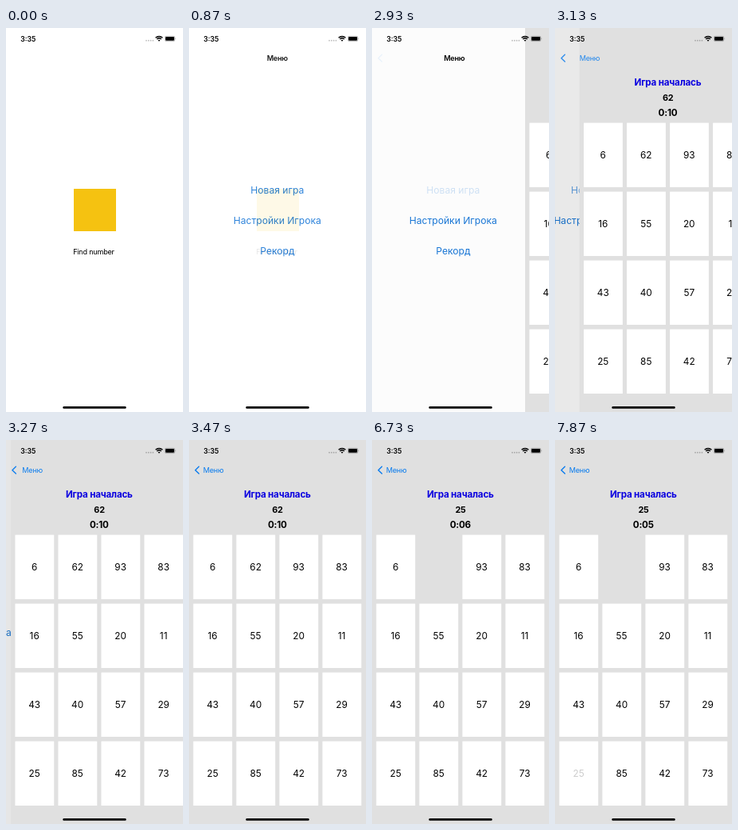
Write an HTML page that moves like this. It is 222 by 480 pixels and loops after 8 s.

```html
<!DOCTYPE html>
<html lang="ru">
<head>
<meta charset="utf-8">
<title>Find number</title>
<style>
  html, body { margin: 0; width: 100%; height: 100%; overflow: hidden; background: #fff; }
  svg { display: block; width: 222px; height: 480px; overflow: hidden; }
  text { font-family: Inter, "Noto Sans", sans-serif; text-anchor: middle; }
  .nav { font-size: 9.1px; letter-spacing: -.025em; }
  .item { font-size: 12.1px; fill: #1a78d8; }
  .num { font-size: 11.8px; }
  .bold { font-size: 11.6px; font-weight: 700; letter-spacing: -.015em; }
  .semi { font-weight: 600; }
  .blue { fill: #087bee; }
</style>
</head>
<body>
<svg viewBox="0 0 222 480">
  <rect width="222" height="480" fill="#fff"/>
  <g id="menu">
    <text id="play" class="item" x="110.8" y="206.6">Новая игра</text>
    <text class="item" x="110.8" y="244.6">Настройки Игрока</text>
    <text class="item" x="110.8" y="282.6">Рекорд</text>
  </g>
  <rect id="dim" width="222" height="480"/>

  <g id="game">
    <rect width="222" height="480" fill="#e0e0e0"/>
    <text class="bold" x="110.8" y="71.6" fill="#0a00e0">Игра началась</text>
    <text id="goal" class="bold" x="111" y="90.8" style="font-size:10.8px"></text>
    <text id="clock" class="bold" x="110.8" y="110.3"></text>
    <g id="cards"></g>
  </g>

  <text id="title" class="nav semi" x="110.8" y="41">Меню</text>
  <text id="back" class="nav blue" x="30.6" y="41">Меню</text>
  <path id="chevron" d="M12.4 33.3 7.9 37.7 12.4 42.1" fill="none" stroke="#087bee"
        stroke-width="1.35" stroke-linecap="round" stroke-linejoin="round"/>

  <g id="splash">
    <rect width="222" height="480" fill="#fff"/>
    <rect x="85" y="201" width="53" height="53" fill="#f5c211"/>
    <text class="nav" x="110" y="282.6">Find number</text>
  </g>

  <g id="status">
    <text class="semi" x="27.8" y="16.6" font-size="8.7">3:35</text>
    <g id="dots" fill="#000" opacity=".27"></g>
    <g id="wifi" fill="none" stroke="#000" stroke-width="1.5"></g>
    <rect x="199.2" y="10.2" width="12.6" height="6.4" rx="1.8" fill="none" stroke="#000" stroke-opacity=".4" stroke-width=".6"/>
    <rect x="200" y="11" width="11" height="4.8" rx="1.1"/>
    <path d="M212.6 12.3q1.1 1.1 0 2.2z" opacity=".5"/>
    <rect x="71.3" y="473.1" width="79.4" height="2.6" rx="1.3"/>
  </g>
</svg>
<script>
const $ = id => document.getElementById(id);
const clamp = v => Math.min(1, Math.max(0, v));

function add(parent, tag, attrs, text = '') {
  const el = document.createElementNS('http://www.w3.org/2000/svg', tag);
  for (const k in attrs) el.setAttribute(k, attrs[k]);
  el.textContent = text;
  return parent.appendChild(el);
}

const numbers = [6, 62, 93, 83, 16, 55, 20, 11, 43, 40, 57, 29, 25, 85, 42, 73];
const cards = {};
numbers.forEach((n, i) => {
  const x = 5.4 + 54 * (i % 4), y = 118.6 + 86 * Math.floor(i / 4);
  const box = add($('cards'), 'g', {});
  add(box, 'rect', { x, y, width: 48.8, height: 80.4, fill: '#fff' });
  const label = add(box, 'text', { x: x + 24.2, y: y + 44.6, class: 'num' }, n);
  cards[n] = { box, label };
});

for (let i = 0; i < 4; i++) add($('dots'), 'circle', { cx: 176 + 2.8 * i, cy: 15.7, r: .85 });
for (const r of [1.4, 4, 6.5]) {
  const dx = r * Math.sin(.74), y = 17 - r * Math.cos(.74);
  add($('wifi'), 'path', { d: `M${192 - dx} ${y}A${r} ${r} 0 0 1 ${192 + dx} ${y}` });
}

const LOOP = 8000, FPS = 15;
const PRESS_PLAY = 2670, PUSH = 2885, PUSH_END = 3470;
const FIRST_TICK = 3730, PRESS_62 = 4330, HIT_62 = 4470, PRESS_25 = 7870;

// Critically damped spring for the screen push
function push(t) {
  if (t < PUSH) return 0;
  if (t >= PUSH_END) return 1;
  const w = 14.2 * (t - PUSH) / 1000;
  return 1 - (1 + w) * Math.exp(-w);
}

const fade = (el, v) => el.setAttribute('opacity', v);
const slide = (el, x) => el.setAttribute('transform', `translate(${x} 0)`);

function draw(time) {
  const t = Math.round(Math.floor((time + 4) * FPS / 1000) * 100 / FPS) * 10;
  const p = push(t), nav = p ** 1.18;

  fade($('splash'), (1 - clamp((t - 600) / 470)) ** 2.75);

  slide($('menu'), -66.6 * p);
  fade($('play'), t < PRESS_PLAY ? 1 : .2 + .8 * clamp((t - 2930) / 330));
  fade($('dim'), .1 * p);
  slide($('game'), 222 * (1 - p));

  slide($('title'), -80 * nav);
  fade($('title'), clamp(1.2 - 1.5 * p));
  slide($('back'), 80 * (1 - nav));
  fade($('back'), p < .3 ? 0 : p);
  fade($('chevron'), p ** 1.3);

  const left = t < FIRST_TICK ? 10 : 9 - Math.floor((t - FIRST_TICK) / 1000);
  $('clock').textContent = '0:' + String(left).padStart(2, '0');
  $('goal').textContent = t < HIT_62 ? 62 : 25;
  fade(cards[62].label, t < PRESS_62 ? 1 : .2);
  fade(cards[62].box, t < HIT_62 ? 1 : 0);
  fade(cards[25].label, t < PRESS_25 ? 1 : .2);
}

const start = performance.now();
function tick() {
  draw((performance.now() - start) % LOOP);
  requestAnimationFrame(tick);
}
tick();
</script>
</body>
</html>
```
